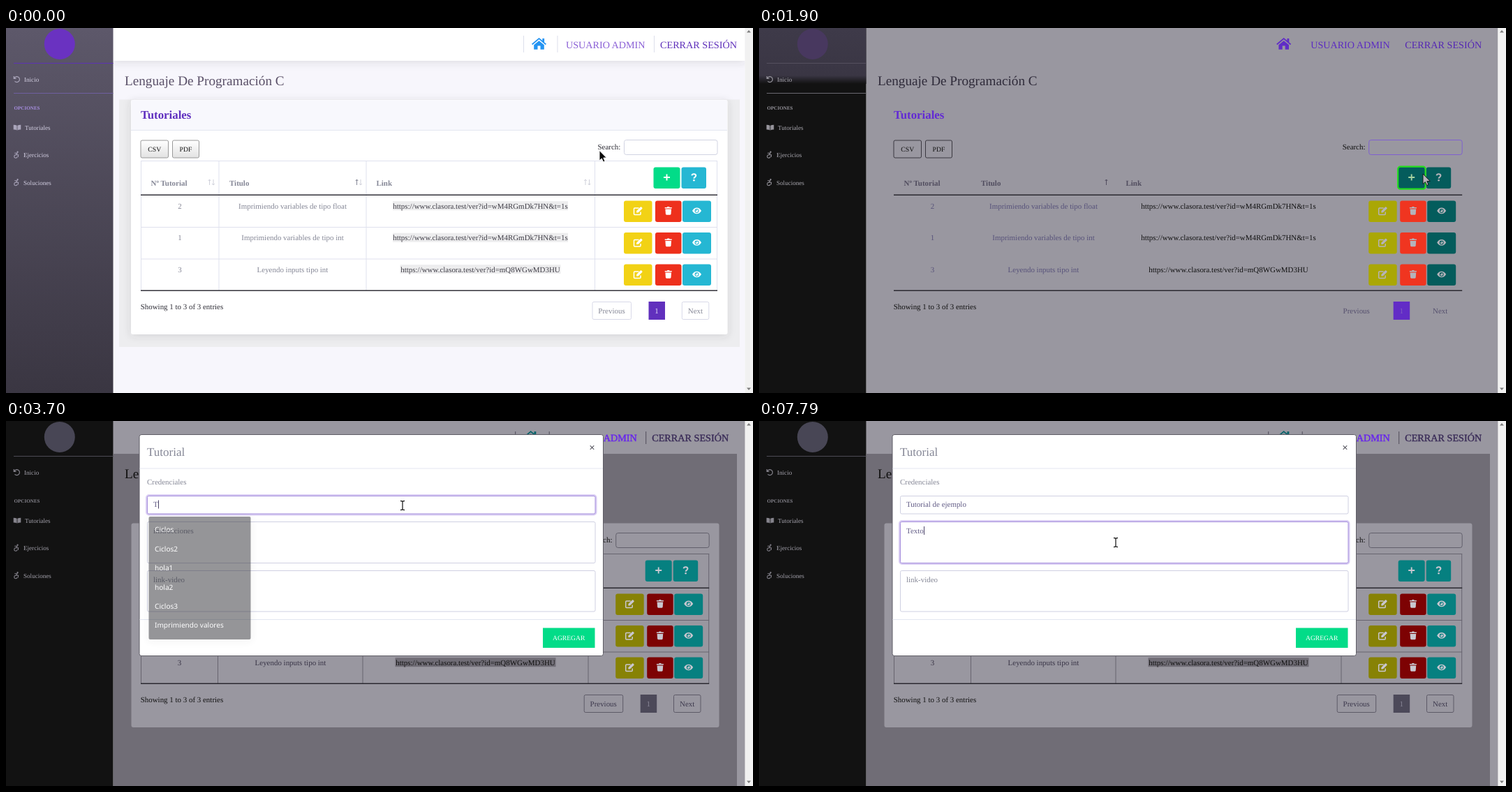
An HTML page that plays this animation: 1070x523 px, repeating every 8000 ms.

```html
<!DOCTYPE html>
<html lang="es">
<head>
<meta charset="utf-8">
<title>Tutoriales</title>
<style>
html, body { margin: 0; width: 100%; height: 100%; overflow: hidden; }
svg { display: block; width: 1070px; height: 523px; }
text { font-family: 'Liberation Serif', 'Times New Roman', serif; text-rendering: geometricPrecision; white-space: pre; }
.menu text { font-family: 'Noto Sans', sans-serif; font-weight: 500; }
.bold { font-weight: bold; }
.mid { text-anchor: middle; }
</style>
</head>
<body>
<svg id="stage" viewBox="0 0 1070 523" xmlns="http://www.w3.org/2000/svg"></svg>
<script>
const LOOP = 8000, BODY = 10.95;

const rect = (x, y, w, h, fill, more = '') =>
  `<rect x="${x}" y="${y}" width="${w}" height="${h}" fill="${fill}" ${more}/>`;
const text = (x, y, size, fill, str, cls = '', more = '') =>
  `<text x="${x}" y="${y}" font-size="${size}" fill="${fill}" class="${cls}" ${more}>${str}</text>`;
const line = (x1, y1, x2, y2, color, w = 1) =>
  `<path d="M${x1} ${y1}L${x2} ${y2}" stroke="${color}" stroke-width="${w}" fill="none"/>`;
const box = (x, y, w, h, fill, stroke, r = 2, more = '') =>
  rect(x, y, w, h, fill, `stroke="${stroke}" rx="${r}" ${more}`);
const at = (x, y, body) => `<g transform="translate(${x} ${y})">${body}</g>`;

// Icons, each centred on its own origin.
const icon = {
  edit: c => `<path d="M1.5-4H-4.5a1 1 0 0 0-1 1V4.500a1 1 0 0 0 1 1H3a1 1 0 0 0 1-1V1.500" fill="none" stroke="${c}" stroke-width="1.5"/>
    <path d="M-2 2.700L-1.700 .2 3.800-5.300a1 1 0 0 1 1.400 0L6.200-4.300a1 1 0 0 1 0 1.400L.6 2.500Z" fill="${c}"/>`,
  trash: c => `<path d="M-5-4.800h3l.8-1h2.400l.8 1h3v1.500H-5ZM-4.300-2.500H4.300L3.800 4.700a1.200 1.200 0 0 1-1.200 1.100H-2.600a1.200 1.200 0 0 1-1.200-1.100Z" fill="${c}"/>`,
  eye: (c, bg) => `<path d="M-6.500 0C-3.500-5.700 3.500-5.700 6.500 0 3.500 5.700-3.500 5.700-6.500 0Z" fill="${c}"/>
    <circle r="3" fill="${bg}"/><circle r="2" fill="${c}"/><circle cx="-.9" cy="-.9" r=".9" fill="${bg}"/>`,
  plus: c => `<path d="M-4.500 0H4.500M0-4.500V4.500" stroke="${c}" stroke-width="1.900" fill="none"/>`,
  help: c => `<path d="M-2.900-2.600C-2.500-5.400 3-5.400 2.900-2.200 2.800-.4 .1-.3 .1 1.700" stroke="${c}" stroke-width="2" fill="none"/><circle cx=".1" cy="4.300" r="1.300" fill="${c}"/>`,
  home: c => `<path d="M-10.500 .3L0-8.600 4.800-4.500V-7.500H7.600V-2.100L10.500 .3 9.300 1.700 0-6.200-9.300 1.700ZM-7.300 1.800L0-4.300 7.300 1.800V8.300H2V3H-2V8.300H-7.300Z" fill="${c}"/>`,
  undo: c => `<path d="M-3.500-1.500A4 4 0 1 1-2.800 2.900M-4-4.500V-1.200H-.8" fill="none" stroke="${c}" stroke-width="1.200"/>`,
  book: c => `<path d="M-5.300-3.700Q-2-3.700-.4-2.700V4Q-2 3-5.300 3ZM5.300-3.700Q2-3.700 .4-2.700V4Q2 3 5.300 3Z" fill="${c}"/>`,
  chair: c => `<circle cx="1.300" cy="-3.800" r="1.100" fill="${c}"/><path d="M-3-2.300L.8-2.200-1 .3H2.300L2 3.500M-1.500 .3A2.200 2.200 0 1 0 .8 3" fill="none" stroke="${c}" stroke-width="1.100"/>`,
};

const bright = {
  shift: 0, cols: [305, 516, 843.5], mids: [249, 410.5, 679.5], heads: [207.5, 320, 530.5],
  side: 'url(#side)', logo: '#6a32c1', rule: '#5d33b4', rule2: '#6f5fa0', nav: '#d3cfe2', sub: '#a78ee0', navIcon: '#aaa5bb',
  bg: '#f7f6fc', home: '#2494f2', user: '#8a5fd6', exit: '#5e2fba', sep: '#dddfeb',
  title: '#5a5068', card: '#5f2fbf', label: '#2d2c35', field: '#fff', fieldLine: '#d1d3e2',
  head: '#858796', row: '#858796', link: '#3f3d46', mark: '#ededee', grid: '#dfe1ee', dark: '#33323a',
  yellow: '#f2d215', red: '#ee301c', teal: '#25b7d3', plus: '#02dc88', ink: '#fff',
  tool: 'url(#tool)', toolLine: '#999', page: '#6130bd', pageInk: '#e6dcf8', pageText: '#858796', pageLine: '#d8d9e8', sort: '#cfd0da'
};
const flash = {
  ...bright, shift: 11.8, cols: [303.5, 511, 834], mids: [248.5, 407.5, 672.5], heads: [207.5, 318, 525.5],
  side: '#121212', logo: '#48385f', rule: '#55505f', rule2: '#6a6870', nav: '#aaa8b0', sub: '#96949c', navIcon: '#96949c',
  bg: '#9997a0', home: '#602cc6', user: '#5c2bc2', exit: '#5527b4', sep: 'none',
  title: '#2f2b3a', card: '#622ad4', label: '#111', field: 'none', fieldLine: '#7f60d0',
  head: '#514d5f', row: '#57527a', link: '#111', mark: 'none', grid: 'none', dark: '#2a2930',
  yellow: '#aaa705', red: '#f03520', teal: '#045c5c', plus: '#045c5c', ink: '#b5b3ba',
  tool: 'none', toolLine: '#3a3840', page: '#622cc6', pageInk: '#8060c0', pageText: '#56506e', pageLine: 'none', sort: 'none'
};
const dim = {
  ...flash, logo: '#484655', rule: '#4d4b55', rule2: 'none', nav: '#a3a1ab', sub: '#85838c', navIcon: '#85838c',
  bg: '#706d76', home: '#09636a', user: '#6723ee', exit: '#3b2d58', sep: '#504d5a',
  title: '#111', fieldLine: '#615f6b', head: '#3e3b47', row: '#383446', mark: '#706d76', grid: '#67646f',
  yellow: '#878205', red: '#7d0203', teal: '#068080', plus: '#068080', ink: '#c9c7d0',
  page: '#4c4959', pageInk: '#8a8797', pageText: '#3d394d', pageLine: '#5d5a67'
};

const rows = [
  ['2', 'Imprimiendo variables de tipo float', 'https://www.clasora.test/ver?id=wM4RGmDk7HN&amp;t=1s', 251],
  ['1', 'Imprimiendo variables de tipo int', 'https://www.clasora.test/ver?id=wM4RGmDk7HN&amp;t=1s', 251],
  ['3', 'Leyendo inputs tipo int', 'https://www.clasora.test/ver?id=mQ8WGwMD3HU', 230],
];

function sidebar(p) {
  const item = (kind, x, y, label) => at(kind === 'book' ? 16 : 15.3, y, icon[kind](p.navIcon)) + text(x, y + 3.500, 9.1, p.nav, label);
  return rect(0, 0, 153.5, 523, p.side) + (p === flash ? rect(0, 0, 153.5, 80, 'url(#sideTop)') : '')
    + `<circle cx="76.800" cy="23" r="22" fill="${p.logo}"/>`
    + line(11, 50.5, 153.5, 50.5, p.rule) + line(11, 93.5, 153.5, 93.5, p.rule2)
    + item('undo', 26, 73.5, 'Inicio') + text(11.5, 116.5, 7.1, p.sub, 'OPCIONES', 'bold')
    + item('book', 27, 142.5, 'Tutoriales') + item('chair', 25, 181.5, 'Ejercicios') + item('chair', 25, 221, 'Soluciones');
}

function backdrop(p) {
  if (p === bright) return rect(153.5, 0, 905, 47, '#fff', 'filter="url(#soft)"')
    + rect(162, 102.5, 889, 354.5, '#ededef')
    + rect(179, 103, 854.5, 336, '#fff', 'rx="3" filter="url(#soft)"')
    + rect(179.5, 103.5, 853.5, 43, '#f8f8fd') + line(179, 146.5, 1033, 146.5, '#e3e6f0');
  if (p === dim) return rect(153.5, 0, 905, 47, '#9997a0') + rect(1047, 47, 11.5, 476, '#9997a0')
    + rect(179.5, 146.5, 842, 292.5, '#9997a0', 'rx="3"');
  return '';
}

function page(p) {
  const s = p.shift, right = 1019 - s, heavy = p === dim ? 'stroke-width=".4" stroke="currentColor"' : '';
  let out = rect(153.5, 0, 905, 523, p.bg) + backdrop(p) + sidebar(p);
  for (const x of [741.5, 790, 928.5]) out += line(x - s, p === dim ? 15 : 11, x - s, p === dim ? 33 : 35, p.sep);
  out += at(763.5 - s, 22.5, icon.home(p.home))
    + text(802 - s, 29, 14.15, p.user, 'USUARIO ADMIN', '', heavy && `${heavy} color="${p.user}"`)
    + text(937 - s, 29, 14.2, p.exit, 'CERRAR SESIÓN', '', heavy && `${heavy} color="${p.exit}"`)
    + text(170, 81.5, 19.2, p.title, 'Lenguaje De Programación C')
    + text(193, 130, 16.85, p.card, 'Tutoriales', 'bold');

  for (const [x, w, label] of [[193, 39.5, 'CSV'], [238.5, 38, 'PDF']])
    out += box(x, 161, w, 25, p.tool, p.toolLine) + text(x + w / 2, 176.500, 9.7, '#111', label, 'mid');
  out += text(847.5 - s, 174, BODY, p.label, 'Search:') + box(885.5 - s, 160.5, 133.5, 21, p.field, p.fieldLine, 3);

  for (const x of [193.5, ...p.cols, right - .5]) out += line(x, 190, x, 376, p.grid);
  for (const y of [190.5, 285.5, 331]) out += line(193, y, right, y, p.grid);
  out += line(193, 239.3, right, 239.3, p.dark, 1.5) + line(193, 376.3, right, 376.3, p.dark, 1.5);
  ['Nº Tutorial', 'Titulo', 'Link'].forEach((label, i) => {
    const x = p.cols[i] - 13.5, up = i === 1 ? p.head : p.sort;
    out += text(p.heads[i], 225.5, BODY, p.head, label, 'bold')
      + `<path d="M${x} 225V217m-1.800 2l1.800-2 1.800 2" fill="none" stroke="${up}"/>`
      + `<path d="M${x + 5.500} 217V225m-1.800-2l1.800 2 1.800-2" fill="none" stroke="${p.sort}"/>`;
  });

  out += rect(927.5 - s, 199.5, 38, 30.5, p.plus, 'rx="3"') + at(946.5 - s, 214, icon.plus(p.ink))
    + rect(967.5 - s, 199.5, 35.5, 30.5, p.teal, 'rx="3"') + at(985.3 - s, 214, icon.help(p.ink));
  rows.forEach(([n, name, url, w], i) => {
    const y = 258.7 + i * 45.5, mid = y + 3.200;
    out += rect(p.mids[2] - w / 2, y - 10.500, w, 13, p.mark)
      + [n, name, url].map((str, k) => text(p.mids[k], y, BODY, k === 2 ? p.link : p.row, str, 'mid')).join('')
      + rect(885 - s, y - 11.2, 40.5, 30.5, p.yellow, 'rx="3"') + at(905 - s, mid, icon.edit(p.ink))
      + rect(930 - s, y - 11.2, 37.5, 30.5, p.red, 'rx="3"') + at(948.700 - s, mid, icon.trash(p.ink))
      + rect(969 - s, y - 11.2, 41, 30.5, p.teal, 'rx="3"') + at(989.5 - s, mid, icon.eye(p.ink, p.teal));
  });

  return out + text(192.7, 402.5, BODY, p.label, 'Showing 1 to 3 of 3 entries')
    + box(840 - s, 392.5, 55.5, 25, 'none', p.pageLine) + text(867.5 - s, 409, BODY, p.pageText, 'Previous', 'mid')
    + rect(920.5 - s, 392, 23.5, 26, p.page) + text(932 - s, 409, BODY, p.pageInk, '1', 'mid')
    + box(968.3 - s, 392.5, 38.5, 25, 'none', p.pageLine) + text(987.5 - s, 409, BODY, p.pageText, 'Next', 'mid');
}

const activePlus = (id, x, fill, ring, ink) => `<g id="${id}">`
  + rect(x, 199.5, 38, 30.5, fill, 'rx="3"')
  + `<g id="${id}Ring">${box(x - .5, 198.7, 39.5, 32, 'none', ring, 3.5, 'stroke-width="2.2"')}</g>`
  + at(x + 19, 214, icon.plus(ink)) + '</g>';

function modal() {
  const field = (id, y, h, hint) => box(202.5, y, 641.5, h, '#fff', '#cfd0e2')
    + `<g id="${id}Ring">${box(202, y - .5, 642.500, h + 1, 'none', '#d9cdf3', 3, 'stroke-width="4"')}${box(202.5, y, 641.5, h, '#fff', '#a58fdc')}</g>`
    + text(211, y + (id === 'name' ? 15.5 : 16), BODY, '#858796', hint, '', `id="${id}Hint"`)
    + text(211, y + (id === 'name' ? 15.5 : 16), BODY, '#625c86', '', '', `id="${id}Text"`);
  const options = ['Ciclos', 'Ciclos2', 'hola1', 'hola2', 'Ciclos3', 'Imprimiendo valores'];
  return box(191, 19.5, 664.5, 317, '#fff', '#5f5d66', 3)
    + text(202, 49.5, 17, '#858796', 'Tutorial') + text(839.5, 42.8, 15, '#55545e', '×', 'bold mid')
    + line(191.500, 68, 855, 68, '#e3e6f0') + line(191.500, 284.5, 855, 284.5, '#e3e6f0')
    + text(202, 91, BODY, '#858796', 'Credenciales')
    + field('name', 107.5, 25.5, 'nombre') + field('info', 144.5, 59, 'instrucciones') + field('link', 214.5, 58.5, 'link-video')
    + '<path id="spell" d="M211 124.300H246" stroke="#e0384a" stroke-width="1.100" stroke-dasharray="1.5 .6"/>'
    + '<rect id="caret" width="1" height="12" fill="#4b4468"/>'
    + rect(769, 296.5, 74.5, 28.5, '#02dc88') + text(806.2, 313.7, 9.6, '#fff', 'AGREGAR', 'mid')
    + '<g id="menu" class="menu">' + rect(204.5, 137, 146, 176, '#333339', 'rx="2" filter="url(#soft)"')
    + options.map((o, i) => text(213, 159.3 + i * 27.4, 10.1, '#fff', o)).join('') + '</g>';
}

const stage = document.getElementById('stage');
stage.innerHTML = `<defs>
  <linearGradient id="side" x2="0" y2="1"><stop stop-color="#5d586a"/><stop offset="1" stop-color="#3a3642"/></linearGradient>
  <linearGradient id="sideTop" x2="0" y2="1"><stop stop-color="#3e3a49"/><stop offset=".85" stop-color="#3a3644"/><stop offset="1" stop-color="#121212"/></linearGradient>
  <linearGradient id="tool" x2="0" y2="1"><stop stop-color="#fff"/><stop offset="1" stop-color="#e2e2e2"/></linearGradient>
  <filter id="soft" x="-10%" y="-60%" width="120%" height="220%"><feDropShadow dx="0" dy="2" stdDeviation="6" flood-color="#3a3b45" flood-opacity=".15"/></filter>
  </defs>
  <g id="bright">${page(bright)}${activePlus('hover', 927.5, '#2ad62e', '#35b5dc', '#fff')}</g>
  <g id="flash">${page(flash)}${activePlus('lit', 915.7, '#045c5c', '#22dd1e', '#a5d2a0')}</g>
  <g id="dim">${page(dim)}${activePlus('held', 915.7, '#058a05', '#4d5a5e', '#c9d8c9')}</g>
  <g id="modal">${modal()}</g>
  ${rect(1058.5, 0, 11.5, 523, '#f1f1f1')}
  <path d="M1061 6.500l3-3.500 3 3.500ZM1061 515.500l3 3.500 3-3.500Z" fill="#7d7d7d"/>
  <path id="arrow" d="M0 0V14.500L3.300 11.500 5.600 16.500 8 15.500 5.800 10.500H10.300Z" stroke-width=".9"/>
  <g id="beam" fill="none"><path d="M-3-6.500H3M-3 6.500H3M0-6.500V6.500" stroke="#fff" stroke-width="3"/>
  <path d="M-3-6.500Q0-6.500 0-5 0-6.500 3-6.500M-3 6.500Q0 6.500 0 5 0 6.500 3 6.500M0-6V6" stroke="#222" stroke-width="1.300"/></g>`;

const el = Object.fromEntries([...stage.querySelectorAll('[id]')].map(n => [n.id, n]));
const ramp = (t, a, b) => Math.min(1, Math.max(0, (t - a) / (b - a)));
const show = (node, on) => node.setAttribute('opacity', Number(on));

const path = [[0, 850, 175.5], [40, 850, 175.5], [220, 876, 186], [390, 876, 186], [610, 830, 171.5], [980, 830, 171.5],
  [1350, 951, 209], [2290, 951, 209], [2440, 884, 209], [2650, 765, 182.5], [3010, 568, 121], [6220, 568, 121], [6450, 511, 174], [LOOP, 511, 174]];
const nameKeys = [3680, 3830, 3900, 3970, 4120, 4330, 4470, 4560, 4650, 4730, 4820, 4900, 5050, 5170, 5320, 5390, 5610, 5690, 5760];
const infoKeys = [6960, 7140, 7320, 7660, 7790];

function pointer(t) {
  const i = path.findIndex(k => k[0] > t), [t0, x0, y0] = path[i - 1], [t1, x1, y1] = path[i];
  const k = ramp(t, t0, t1);
  return [x0 + (x1 - x0) * k, y0 + (y1 - y0) * k];
}

function type(id, str, keys, t) {
  const typed = str.slice(0, keys.filter(k => t >= k - 4).length);
  el[id + 'Text'].textContent = typed;
  show(el[id + 'Hint'], !typed);
  return 211 + (typed ? el[id + 'Text'].getComputedTextLength() : 0);
}

function draw(t) {
  const dimmed = t >= 1970, lit = t >= 1800 && !dimmed;
  show(el.bright, t < 1800);
  show(el.flash, lit);
  show(el.dim, dimmed);
  show(el.hover, t >= 1330);
  show(el.hoverRing, ramp(t, 1650, 1730));
  show(el.held, 1 - ramp(t, 3260, 3420));

  const slide = 1 - (1 - ramp(t, 1960, 2260)) ** 2;
  el.modal.setAttribute('transform', `translate(0 ${-50 * (1 - slide)})`);
  show(el.modal, ramp(t, 1960, 2110));

  const nameEnd = type('name', 'Tutorial de ejemplo', nameKeys, t);
  const infoEnd = type('info', 'Texto', infoKeys, t);
  const onInfo = t >= 6720;
  show(el.nameRing, ramp(t, 3260, 3420) * (1 - ramp(t, 6720, 6880)));
  show(el.infoRing, ramp(t, 6720, 6880));
  show(el.linkRing, 0);
  show(el.spell, t >= 4646 && t < 6260);
  show(el.menu, ramp(t, 3340, 3460) * (1 - ramp(t, 3640, 3765)));
  show(el.caret, t >= 3270);
  el.caret.setAttribute('x', (onInfo ? infoEnd : nameEnd) + .3);
  el.caret.setAttribute('y', onInfo ? 151 : 113.5);

  const [x, y] = pointer(t), inField = dimmed && x < 855;
  for (const node of [el.arrow, el.beam]) node.setAttribute('transform', `translate(${x} ${y})`);
  el.arrow.setAttribute('fill', lit ? '#b5b3ba' : '#0a0a0a');
  el.arrow.setAttribute('stroke', lit ? '#111' : '#fff');
  show(el.arrow, !inField);
  show(el.beam, inField);
}

const start = performance.now();
function tick() {
  draw((performance.now() - start) % LOOP);
  requestAnimationFrame(tick);
}
tick();
</script>
</body>
</html>
```
